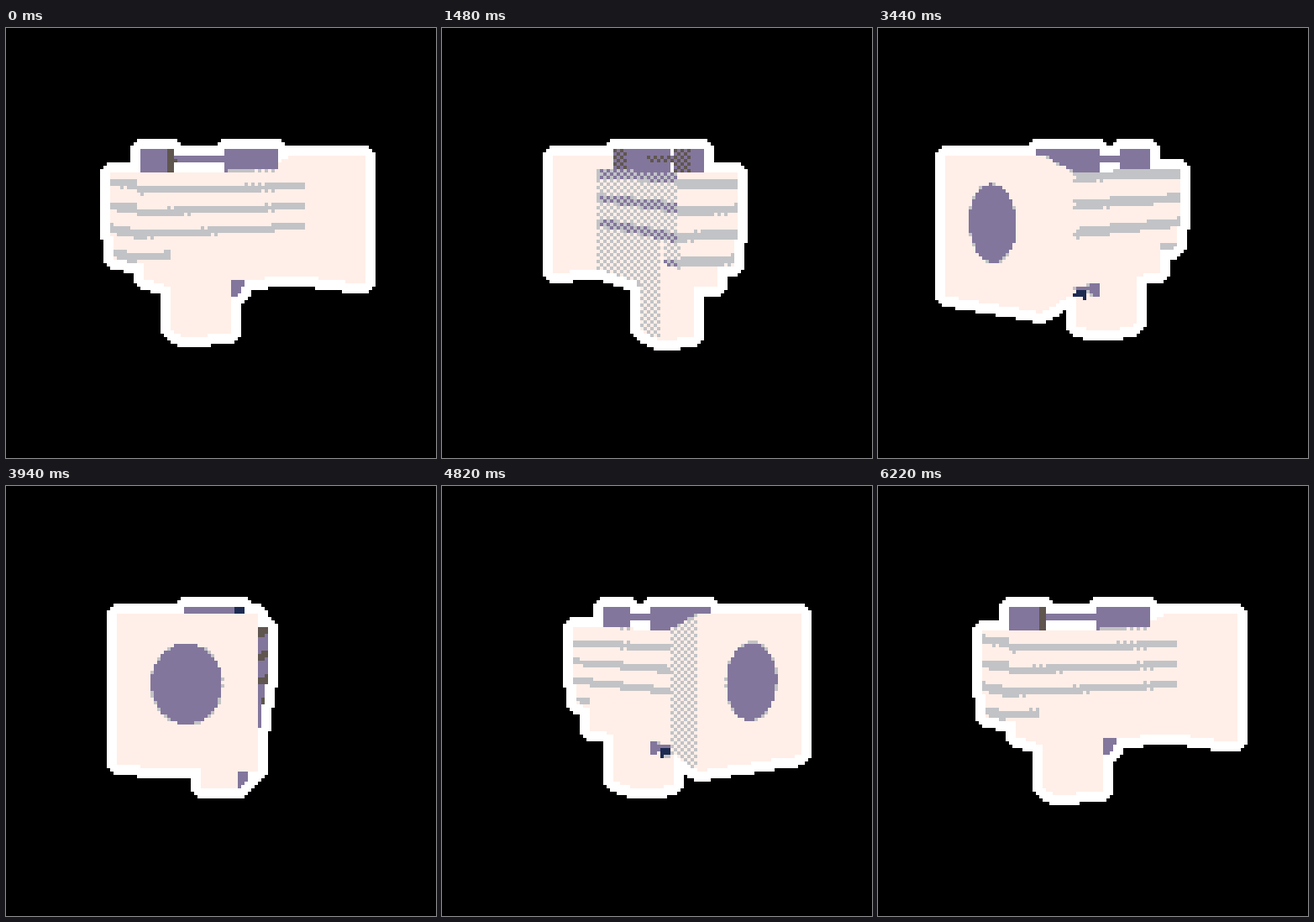
An HTML page without scripts for the animation above (6240 ms loop, 512x512 px).

```html
<!DOCTYPE html>
<html lang="en">
<head>
<meta charset="utf-8">
<title>Turning model</title>
<style>
@property --s { syntax: "<number>"; inherits: false; initial-value: 0; }
html, body { margin: 0; width: 100%; height: 100%; overflow: hidden; background: #000; }
svg { position: absolute; width: 0; height: 0; }
#view {
  position: absolute; left: 0; top: 0; width: 512px; height: 512px;
  perspective: 1000px; perspective-origin: 256px 152px;
  filter: url(#pixels);
}
.model, .box { position: absolute; left: 0; top: 0; width: 0; height: 0; transform-style: preserve-3d; transform-origin: 0 0; }
.model { left: 256px; top: 152px; animation: turn 6.24s steps(312) infinite; }

/* Grey values are tones; the filter maps them to the palette.
   --a start, --l length, --w half width, --y top, --h height */
i {
  position: absolute; left: 0; top: 0; height: var(--h);
  transform-origin: 0 0; backface-visibility: hidden;
  background:
    linear-gradient(rgb(0 0 0 / var(--s)) 0 0),
    var(--g, none) 0 var(--o, 0px) / 100% var(--n, 100%) no-repeat
    var(--c, #fff);
  animation: shade 6.24s linear infinite;
}
.r, .l { width: var(--l); }
.f, .b { width: calc(2 * var(--w)); }
.r { transform: translate3d(var(--w), var(--y), calc(var(--a) + var(--l))) rotateY(90deg); animation-delay: -525ms; }
.l { transform: translate3d(calc(-1 * var(--w)), var(--y), var(--a)) rotateY(-90deg); animation-delay: -3645ms; }
.f { transform: translate3d(calc(-1 * var(--w)), var(--y), calc(var(--a) + var(--l))); animation-delay: -5205ms; }
.b { transform: translate3d(var(--w), var(--y), var(--a)) rotateY(180deg); animation-delay: -2085ms; }

.rib .r { --g: repeating-linear-gradient(#999 0 11px, #fff 0 31px); }
.rib .l { --g: repeating-linear-gradient(#fff 0 16px, #999 0 24px); }
.rib .b { --g: repeating-linear-gradient(#fff 0 8px, #999 0 18px, #fff 0 27px); }
.body { --a: -85px; --l: 182px; --w: 36.5px; --y: 18px; --h: 127px; --n: 74px; }
.body .b { --g: none; }
.rear { --a: -125px; --l: 41px; --w: 36.5px; --y: 18px; --h: 73.5px; }
.low { --a: -125px; --l: 41px; --w: 33px; --y: 91px; --h: 27px; --o: -73px; --n: 100px; }
.grip { --a: -57px; --l: 60px; --w: 22px; --y: 143px; --h: 64px; }
.dark { --c: #5c5c5c; }
.back { --a: -103px; --l: 39px; --w: 8px; --y: -8px; --h: 30px; }
.back .l { animation: shade 6.24s linear -3645ms infinite, notch 6.24s infinite; }
.front { --a: 22px; --l: 42px; --w: 29px; --y: -8px; --h: 30px; }
.bar { --a: -65px; --l: 88px; --w: 3px; --y: 0px; --h: 8px; }
.trigger { --a: 2px; --l: 22px; --w: 13px; --y: 143px; --h: 24px; }
.trigger .r { clip-path: polygon(0 0, 100% 0, 100% 100%, 50% 100%, 0 60%); }
.trigger .l { clip-path: polygon(0 0, 100% 0, 100% 60%, 50% 100%, 0 100%); }
.trigger .f { --g: linear-gradient(#5c5c5c 60%, #1c1c1c 0); }

.flare { --a: 97px; --l: 63px; --w: 74px; --y: 0px; --h: 156px; }
.flare .f { --g: radial-gradient(37.5px 41.5px at 50% 71px, #5c5c5c 98%, #fff); }
.flare .b { --w: 60px; --y: 18px; --h: 128px; }
.flare .r, .flare .l { width: 64.6px; }
.flare .r {
  transform: translate3d(74px, 0, 160px) rotateY(102.5deg); animation-delay: -742ms;
  clip-path: polygon(0 0, 100% 18px, 100% 146px, 0 100%);
}
.flare .l {
  transform: translate3d(-60px, 0, 97px) rotateY(-102.5deg); animation-delay: -3428ms;
  clip-path: polygon(0 18px, 100% 0, 100% 100%, 0 146px);
}
.flare .t {
  width: 148px; height: 65.5px; animation: none;
  transform: translate3d(-74px, 18px, 97px) rotateX(106deg);
  clip-path: polygon(14px 0, 134px 0, 100% 100%, 0 100%);
}

@keyframes turn { from { transform: rotateY(120.3deg); } to { transform: rotateY(480.3deg); } }
@keyframes shade {
  0%, 29%, 71%, 100% { --s: .64; }
  32.75%, 67.25% { --s: .08; }
  33.3%, 66.7% { --s: .05; }
}
@keyframes notch {
  0%, 5%, 95%, 100% { --g: linear-gradient(90deg, #5c5c5c 30px, #373737 0); }
  5.1%, 94.9% { --g: none; }
}
</style>
</head>
<body>
<svg aria-hidden="true">
  <filter id="pixels" filterUnits="userSpaceOnUse" x="0" y="0" width="512" height="512" color-interpolation-filters="sRGB">
    <!-- checker dither -->
    <feFlood x="4" y="0" width="4" height="4" flood-color="#000" flood-opacity=".225" result="c1"/>
    <feFlood x="0" y="4" width="4" height="4" flood-color="#000" flood-opacity=".225" result="c2"/>
    <feMerge x="0" y="0" width="8" height="8"><feMergeNode in="c1"/><feMergeNode in="c2"/></feMerge>
    <feTile result="checker"/>
    <feComposite in="checker" in2="SourceGraphic" operator="atop" result="toned"/>
    <!-- one sample per 4px cell -->
    <feFlood x="2" y="2" width="1" height="1" flood-color="#000" result="dot"/>
    <feOffset in="dot" dx="0" dy="0" x="0" y="0" width="4" height="4"/>
    <feTile result="grid"/>
    <feComposite in="toned" in2="grid" operator="in"/>
    <!-- palette: navy, brown, purple, grey, cream -->
    <feComponentTransfer result="p0">
      <feFuncR type="discrete" tableValues=".114 .114 .114 .373 .373 .514 .514 .514 .761 .761 .761 .761 .761 .761 1 1 1 1 1 1"/>
      <feFuncG type="discrete" tableValues=".169 .169 .169 .341 .341 .463 .463 .463 .765 .765 .765 .765 .765 .765 .941 .941 .941 .941 .941 .941"/>
      <feFuncB type="discrete" tableValues=".325 .325 .325 .31 .31 .612 .612 .612 .78 .78 .78 .78 .78 .78 .91 .91 .91 .91 .91 .91"/>
      <feFuncA type="discrete" tableValues="0 1"/>
    </feComponentTransfer>
    <!-- grow samples to full cells -->
    <feOffset in="p0" dx="1" dy="0"/><feComposite in2="p0" result="p1"/>
    <feOffset in="p1" dx="-2" dy="0"/><feComposite in2="p1" result="p2"/>
    <feOffset in="p2" dx="0" dy="1"/><feComposite in2="p2" result="p3"/>
    <feOffset in="p3" dx="0" dy="-2"/><feComposite in2="p3" result="art"/>
    <!-- rounded white outline -->
    <feMorphology in="art" operator="dilate" radius="12 4" result="o1"/>
    <feMorphology in="art" operator="dilate" radius="8 8" result="o2"/>
    <feMorphology in="art" operator="dilate" radius="4 12" result="o3"/>
    <feMerge result="edge"><feMergeNode in="o1"/><feMergeNode in="o2"/><feMergeNode in="o3"/></feMerge>
    <feFlood flood-color="#fff"/>
    <feComposite in2="edge" operator="in" result="line"/>
    <feMerge><feMergeNode in="line"/><feMergeNode in="art"/></feMerge>
  </filter>
</svg>
<div id="view">
  <div class="model">
    <div class="box rib body"><i class="r"></i><i class="l"></i><i class="b"></i></div>
    <div class="box rib rear"><i class="r"></i><i class="l"></i><i class="b"></i></div>
    <div class="box rib low"><i class="r"></i><i class="l"></i><i class="b"></i></div>
    <div class="box grip"><i class="r"></i><i class="l"></i><i class="f"></i><i class="b"></i></div>
    <div class="box dark trigger"><i class="r"></i><i class="l"></i><i class="f"></i></div>
    <div class="box dark bar"><i class="r"></i><i class="l"></i></div>
    <div class="box dark back"><i class="r"></i><i class="l"></i><i class="f"></i><i class="b"></i></div>
    <div class="box dark front"><i class="r"></i><i class="l"></i><i class="f"></i><i class="b"></i></div>
    <div class="box flare"><i class="r"></i><i class="l"></i><i class="f"></i><i class="b"></i><i class="t"></i></div>
  </div>
</div>
</body>
</html>
```
